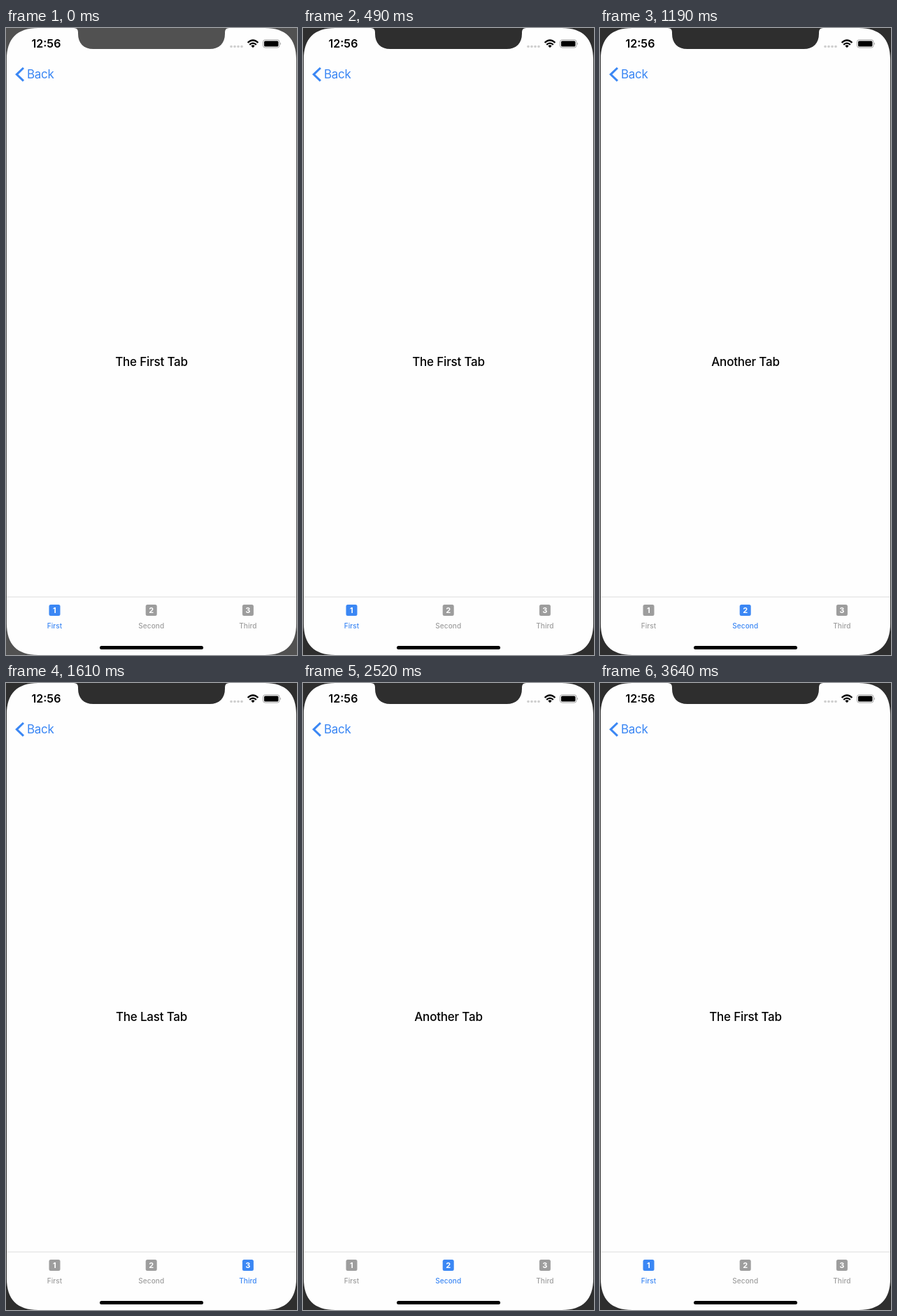
Write an HTML page that moves like this. It is 416 px wide and 896 px high and loops after 4.13 s.

```html
<!DOCTYPE html>
<html lang="en">
<head>
<meta charset="utf-8">
<title>Tab bar</title>
<style>
  html, body { margin: 0; width: 100%; height: 100%; overflow: hidden; background: #fefefe; }
  svg { display: block; width: 416px; height: 896px; font-family: Inter, sans-serif; }
  .middle { text-anchor: middle; }
  .title { font-size: 17px; font-weight: 500; letter-spacing: -.2px; }
  .tab { fill: #9d9d9d; font-size: 10px; font-weight: 500; letter-spacing: .1px; }
  .tab.active { fill: #3b87f4; }
  .digit { fill: #fff; font-size: 11px; font-weight: 700; }
</style>
</head>
<body>
<svg viewBox="0 0 416 896">
  <rect width="416" height="896" fill="#fefefe"/>
  <path d="M1 813H415" stroke="#dcdcdc"/>

  <!-- device edge with rounded corners and notch -->
  <path id="bezel" fill-rule="evenodd" d="M0 0H416V896H0Z
    M46 0H97Q103 0 103 6V8C103 22 111 30 125 30H291C305 30 313 22 313 8V6Q313 0 319 0H370
    C400 0 415 15 415 45V851C415 881 400 896 370 896H46C16 896 1 881 1 851V45C1 15 16 0 46 0Z"/>

  <!-- status bar -->
  <text x="36.5" y="28.3" font-size="16" font-weight="600">12:56</text>
  <g fill="#cfcfcf">
    <circle cx="322" cy="26.5" r="1.8"/><circle cx="327" cy="26.5" r="1.8"/>
    <circle cx="332" cy="26.5" r="1.8"/><circle cx="337" cy="26.5" r="1.8"/>
  </g>
  <g fill="none" stroke="#000" stroke-width="2.3">
    <path d="M345.6 21Q353 14 360.4 21M348.2 23.8Q353 19.4 357.8 23.8"/>
    <path d="M350.4 25.4Q353 23.2 355.6 25.4L353 28.2Z" fill="#000" stroke="none"/>
  </g>
  <rect x="367.5" y="16.9" width="23.4" height="11.2" rx="3" fill="none" stroke="#a3a3a3"/>
  <rect x="369" y="18.4" width="20.4" height="8.2" rx="1.7"/>
  <path d="M392 20.6Q394 22.5 392 24.4Z" fill="#a3a3a3"/>

  <!-- navigation -->
  <path d="M25 57L15.3 66.3L25 75.6" fill="none" stroke="#3b87f4" stroke-width="3"/>
  <text x="30" y="72.3" fill="#3b87f4" font-size="17" letter-spacing="-.3">Back</text>

  <text id="title" class="title middle" x="208" y="483"/>
  <g id="tabs"></g>
  <rect x="134" y="883" width="148" height="5" rx="2.5"/>
</svg>
<script>
const LOOP = 4130;
const titles = ["The First Tab", "Another Tab", "The Last Tab"];
const selections = [[0, 0], [560, 1], [1610, 2], [2520, 1], [3640, 0]];

const byId = id => document.getElementById(id);
const bezel = byId("bezel"), title = byId("title"), tabs = byId("tabs");

tabs.innerHTML = ["First", "Second", "Third"].map((label, i) => `
  <g class="tab middle" transform="translate(${69.5 + i * 138.2})">
    <rect x="-8" y="824" width="16" height="16" rx="2.5"/>
    <text class="digit" y="836">${i + 1}</text>
    <text y="858">${label}</text>
  </g>`).join("");

function draw() {
  const time = performance.now() % LOOP;
  const selected = selections.filter(([start]) => start <= time).pop()[1];
  bezel.setAttribute("fill", time < 490 ? "#515151" : "#2e2e2e");
  title.textContent = titles[selected];
  [...tabs.children].forEach((tab, i) => tab.classList.toggle("active", i === selected));
  requestAnimationFrame(draw);
}
draw();
</script>
</body>
</html>
```
